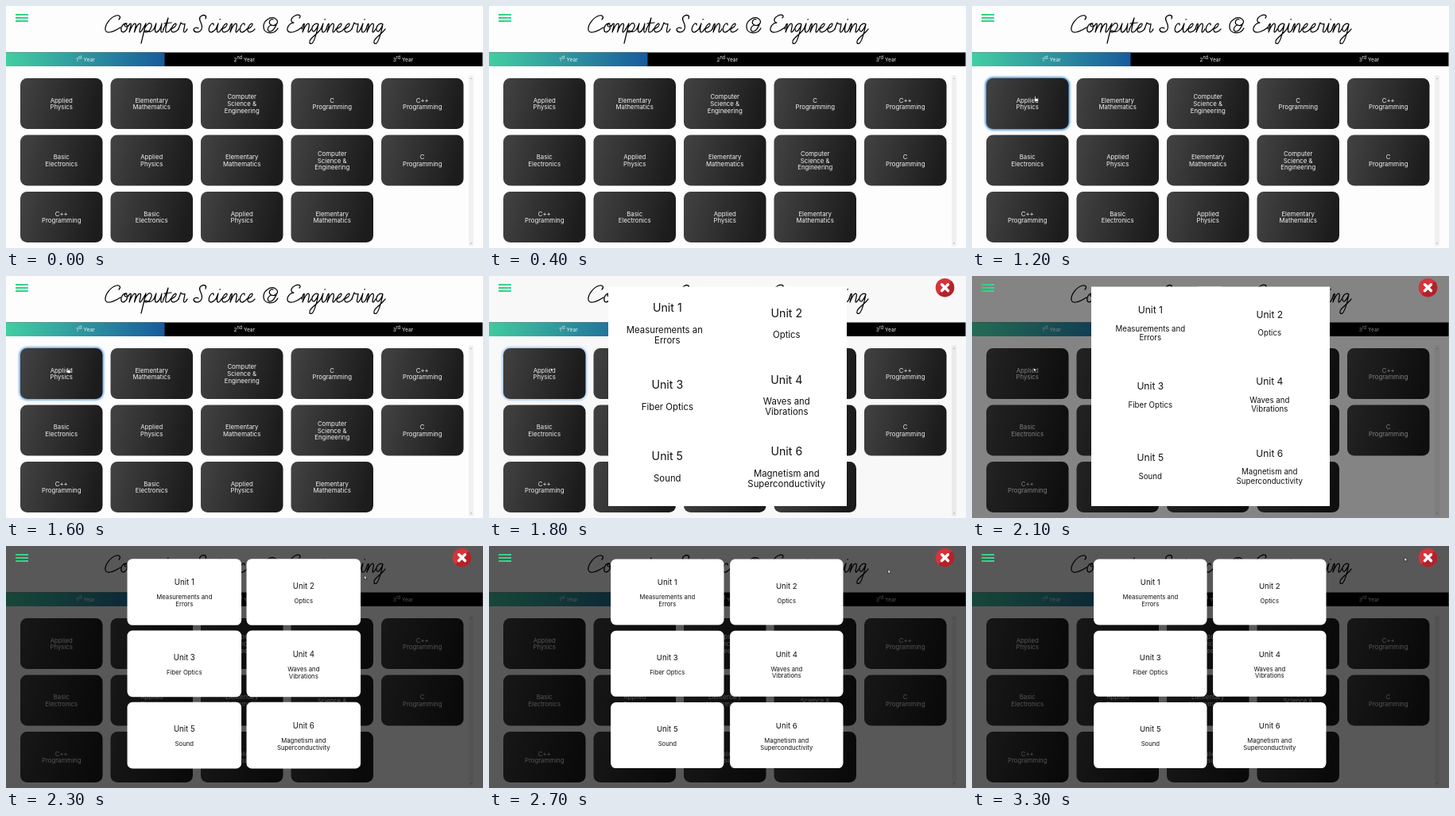
An HTML page for the animation above (3.4 s loop, 600 by 305 pixels).

```html
<!DOCTYPE html>
<html lang="en">
<head>
<meta charset="utf-8">
<title>Course units</title>
<style>
  html, body { margin: 0; width: 100%; height: 100%; overflow: hidden; background: #fdfdfd; }
  svg { display: block; width: 100%; height: 100%; }
  text { font-family: Inter, sans-serif; text-anchor: middle; }
  #title { fill: none; stroke: #000; stroke-width: 1.25; stroke-linecap: round; stroke-linejoin: round; }
  #nav, #cards text { fill: #f2f2f2; }
  #nav { font-size: 6.6px; }
  #cards { font-size: 7.8px; }
  #units { font-size: 7.7px; fill: #111; }
  #units .head { font-size: 9.6px; }
  #glow { fill: none; stroke: #4f9be6; stroke-width: 3.5; filter: blur(1.3px); }
  #cursor path { fill: #fff; stroke: #111; stroke-width: .6; stroke-linejoin: round; }
</style>
</head>
<body>
<svg viewBox="0 0 600 305">
  <defs>
    <linearGradient id="tab"><stop stop-color="#43cea2"/><stop offset="1" stop-color="#185a9d"/></linearGradient>
    <linearGradient id="card" x2="1" y2=".15"><stop stop-color="#434343"/><stop offset="1" stop-color="#1c1c1c"/></linearGradient>
    <linearGradient id="menu"><stop stop-color="#2fd36f"/><stop offset="1" stop-color="#3ad6a0"/></linearGradient>
    <linearGradient id="red" x2="1" y2="1"><stop offset=".5" stop-color="#d8323a"/><stop offset=".5" stop-color="#b3222a"/></linearGradient>
    <clipPath id="panel"><path d="M150 13.5h300v276.5h-300z"/></clipPath>
  </defs>
  <g id="title" role="img" aria-label="Computer Science &amp; Engineering"></g>
  <path d="M0 58.5h599.5v17.5h-599.5z"/>
  <path d="M0 58.5h199.5v17.5h-199.5z" fill="url(#tab)"/>
  <g id="nav"></g>
  <path d="M582 87.5h6v215h-6z" fill="#f0f0f0"/>
  <path d="M583.8 92l1.2-1.6 1.2 1.6zM583.8 298.6l1.2 1.6 1.2-1.6z" fill="#aaa"/>
  <rect id="glow" x="18" y="91" width="103.5" height="64" rx="8.5"/>
  <g id="cards"></g>
  <path id="shade" d="M0 0h600v305h-600z"/>
  <g id="units" clip-path="url(#panel)"></g>
  <path d="M12 10h16v2h-16zM12 14h16v2h-16zM12 18h16v2h-16z" fill="url(#menu)"/>
  <g id="close">
    <circle cx="573.5" cy="14.7" r="11.8" fill="url(#red)"/>
    <path d="M569.6 10.8l7.8 7.8m0-7.8l-7.8 7.8" stroke="#fff" stroke-width="3.6" stroke-linecap="round"/>
  </g>
  <g id="cursor">
    <path id="arrow" d="M0 0v5l1.2-1 .9 1.8 .9-.4-.9-1.8h1.6z"/>
    <path id="hand" d="M-.7 .6q.7-1.2 1.4 0v2.2l2.6.7q1 .4.8 1.5l-.6 2h-3.4l-2-2.8q.2-1 1.2-.2z"/>
  </g>
</svg>
<script>
const $ = id => document.getElementById(id);
const label = (x, y, s, cls = '') => `<text x="${x}" y="${y}" class="${cls}">${s}</text>`;

// Handwriting: [advance, pen path from the baseline]
const pen = {
  C: [20, 'M18-16C21-19 19-22 15-21C7-19 0-9 1-3C2 2 9 1 20-6'],
  S: [18, 'M15-17C17-21 13-23 9-20C4-16 13-10 10-4C8 1 1 1 0-3C0-6 4-6 6-5'],
  E: [18, 'M15-18C18-21 14-23 10-21C4-18 3-13 8-12C2-12-2-4 1-1C4 2 12-1 18-6'],
  '&': [22, 'M20-5C16 3 3 3 2-6C1-14 11-21 17-17C23-13 17-7 12-9C7-11 10-18 14-16M12-9C6-7 6 0 11-1C15-2 16-6 18-9'],
  o: [10, 'M8-11C3-12 0-6 1-2C2 2 8-1 8.5-6C9-10 6-12 5-9C5-7 8-6 10-8'],
  m: [18, 'M0-8C2-12 4-12 3-8L1 0C3-5 6-11 8-11C11-11 8-4 7.5 0C9-5 12-11 14.5-11C17-11 14-3 14-1C14 1 16 0 18-4'],
  n: [12, 'M0-4C2-12 4-12 3-8L1 0C3-5 6-11 8-11C11-11 8-3 8-1C8 1 10 0 12-4'],
  p: [14, 'M0-4L4-11L-2 14M2-4C5-10 8-12 10-11C13-9 9 0 4 0C2 0 2-2 4-2C8 1 12-1 14-4'],
  u: [12, 'M0-4L3-11C1-4 1 0 3 0C6 0 9-6 10-11C9-5 8 0 10 0C11 0 12-2 12-4'],
  t: [9, 'M0-4C3-9 5-14 6-18C4-8 1 0 4 0C6 0 8-2 9-4M1-11L10-12'],
  e: [10, 'M0-4C4-5 8-8 7-10.5C6-12 1-8 1-3C1 2 7 0 10-4'],
  r: [11, 'M0-4L3-12C4-10 6-10 8-10.5C8-7 5 0 7.5 0C9 0 10-2 11-4'],
  i: [7, 'M0-4L3-11C1-4 1 0 3 0C5 0 6-2 7-4M5-16l.3-.3'],
  c: [10, 'M7-9C8-12 4-12 2-7C0-2 2 0 4 0C6 0 8-2 10-4'],
  g: [12, 'M9-10C5-13 0-7 1-3C2 2 7-3 9-10C7 0 5 10 1 14C-3 16-3 11 0 8C4 4 9 0 12-4']
};
const write = (word, x) => [...word].map(ch => {
  const [advance, d] = pen[ch];
  const glyph = `<path d="${d}" transform="translate(${x} 33)"/>`;
  x += advance;
  return glyph;
}).join('');
$('title').innerHTML = write('Computer', 124) + write('Science', 236) + write('&', 322) + write('Engineering', 354);

$('nav').innerHTML = ['1st', '2nd', '3rd'].map((s, i) => label(100 + i * 199.7, 69.6,
  `${s[0]}<tspan dy="-2.3" font-size="5.5">${s.slice(1)}</tspan><tspan dy="2.3"> Year</tspan>`)).join('');

const subjects = ['Applied/Physics', 'Elementary/Mathematics', 'Computer/Science &amp;/Engineering',
  'C/Programming', 'C++/Programming', 'Basic/Electronics'];
$('cards').innerHTML = Array.from({ length: 14 }, (_, i) => {
  const x = 18 + i % 5 * 113.5, y = 91 + Math.floor(i / 5) * 71.5;
  const lines = subjects[i % 6].split('/');
  return `<rect x="${x}" y="${y}" width="103.5" height="64" rx="8.5" fill="url(#card)"/>` +
    lines.map((s, k) => label(x + 51.7, y + 35 + (k - (lines.length - 1) / 2) * 8.7, s)).join('');
}).join('');

const topics = ['Measurements and/Errors', 'Optics', 'Fiber Optics', 'Waves and/Vibrations',
  'Sound', 'Magnetism and/Superconductivity'];
$('units').innerHTML = topics.map((topic, i) => {
  const lines = topic.split('/'), top = lines.length > 1 ? -8.6 : -4.3;
  return '<g><rect x="-71.2" y="-41.5" width="142.4" height="83" rx="6.5" fill="#fff"/>' +
    label(0, top, `Unit ${i + 1}`, 'head') +
    lines.map((s, k) => label(0, top + 18 + k * 8.8, s)).join('') + '</g>';
}).join('');
const units = [...$('units').children];

// Linear value at t through [time, value] points
const track = (t, points) => {
  const k = points.findIndex(p => p[0] > t);
  if (k < 0) return points[points.length - 1][1];
  if (!k) return points[0][1];
  const [t0, a] = points[k - 1], [t1, b] = points[k];
  return a + (b - a) * (t - t0) / (t1 - t0);
};
const show = (id, on) => $(id).setAttribute('visibility', on ? 'visible' : 'hidden');

function draw(t) {
  const open = t >= 1700;
  const scale = track(t, [[1700, 1.5], [1800, 1.48], [2100, 1.26], [2200, 1.1], [2300, 1.008], [2500, 1]]);
  units.forEach((g, i) => g.setAttribute('transform',
    `translate(${224.3 + i % 2 * 150} ${58 + Math.floor(i / 2) * 90.3}) scale(${scale})`));
  show('units', open);
  show('close', open);
  $('shade').setAttribute('opacity', track(t, [[1700, 0], [1800, .02], [2100, .48], [2300, .65]]));
  $('glow').setAttribute('opacity', track(t, [[900, 0], [1200, 1], [1500, 1], [1800, .45], [2100, 0]]));

  const x = track(t, [[900, 112], [1200, 79.5], [1500, 77.5], [2100, 77.5], [2300, 450.5], [2500, 456], [3000, 571], [3300, 544]]);
  const y = track(t, [[900, 95], [1200, 113.5], [1500, 115.5], [2100, 115.5], [2300, 37], [2500, 36], [3000, 20], [3300, 14.3]]);
  const hand = t < 1700 || Math.hypot(x - 573.5, y - 14.7) < 12;
  $('cursor').setAttribute('transform', `translate(${x} ${y})`);
  show('arrow', t >= 900 && !hand);
  show('hand', t >= 900 && hand);
}

const start = performance.now();
function tick() {
  const t = (performance.now() - start) % 3400;
  draw(Math.floor(t / 100) * 100);
  requestAnimationFrame(tick);
}
tick();
</script>
</body>
</html>
```
